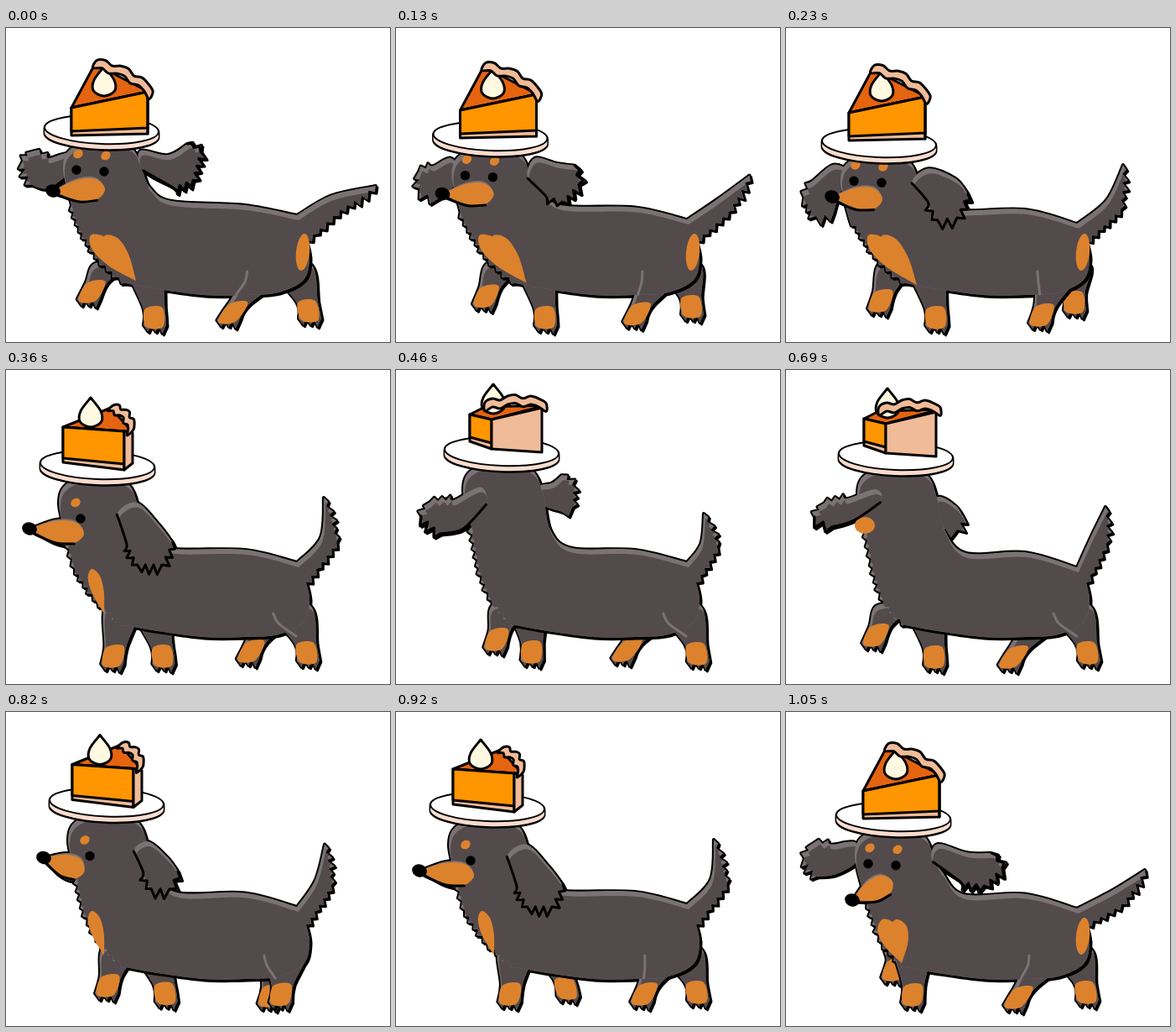
An HTML page with a canvas that plays this animation: 458 px wide and 374 px high, repeating every 1.15 s.

```html
<!DOCTYPE html>
<html lang="en">
<head>
<meta charset="utf-8">
<title>Dachshund with pie</title>
<style>
html, body { margin: 0; width: 100%; height: 100%; overflow: hidden; background: #fff; }
canvas { display: block; }
</style>
</head>
<body>
<canvas id="stage" width="458" height="374"></canvas>
<script>
const ctx = document.getElementById('stage').getContext('2d');
const INK = '#000', COAT = '#534a4b', SHEEN = '#7b7274', TAN = '#dc822d';
const ORANGE = '#ff9500', FILLING = '#e4640f', CRUST = '#f0bb98', CREAM = '#fff9e2';

// Ears: root x, y, end x, y, bow, half width. Tail: tip x, y, bow.
// Paws: near front, far front, near rear, far rear.
const poses = [
  { view: 'front', plate: [114, 121], lift: 5, bob: -6, tail: [441, 188, -7],
    nose: [56, 194], cheek: [118, 192], bib: [155, 301],
    earL: [76, 160, 20, 158, -14, 20], earR: [162, 158, 232, 147, 18, 22],
    paws: [[177, 346], [102, 315], [270, 340], [361, 338]] },
  { view: 'front', plate: [111, 137], lift: -5, bob: 4, tail: [402, 163, 16],
    nose: [55, 201], cheek: [115, 204], bib: [156, 306],
    earL: [66, 168, 36, 224, 6, 20], earR: [160, 176, 204, 226, -8, 24],
    paws: [[179, 346], [113, 326], [305, 343], [344, 328]] },
  { view: 'side', plate: [109, 113], lift: 0, bob: 0, tail: [379, 152, 20],
    nose: [28, 189], cheek: [93, 195], bib: [117, 290],
    earL: null, earR: [144, 165, 186, 232, 0, 25],
    paws: [[128, 342], [187, 342], [359, 338], [292, 336]] },
  { view: 'back', plate: [126, 97], lift: 0, bob: 0, tail: [367, 171, 14],
    nose: [62, 157], cheek: [80, 172], bib: null,
    earL: [104, 150, 30, 174, -12, 20], earR: [172, 150, 210, 137, 8, 20],
    paws: [[120, 322], [162, 337], [359, 339], [275, 335]] },
  { view: 'back', plate: [131, 102], lift: 0, bob: 6, tail: [381, 163, 6],
    nose: [62, 158], cheek: [94, 185], bib: null,
    earL: [110, 150, 34, 175, -5, 15], earR: [178, 155, 204, 190, -4, 13],
    paws: [[107, 317], [177, 343], [360, 338], [271, 343]] },
  { view: 'side', plate: [109, 113], lift: 0, bob: 0, tail: [379, 152, 20],
    nose: [28, 189], cheek: [93, 195], bib: [117, 290],
    earL: null, earR: [144, 165, 186, 232, 0, 25],
    paws: [[136, 337], [203, 330], [296, 337], [359, 335]] },
  { view: 'front', plate: [128, 125], lift: 0, bob: 5, tail: [428, 188, 8],
    nose: [79, 224], cheek: [127, 202], bib: [138, 299],
    earL: [84, 166, 22, 174, -6, 20], earR: [178, 168, 258, 186, 9, 20],
    paws: [[151, 338], [129, 308], [277, 341], [358, 335]] }
];

// Corners of the slice, from the middle of the plate: x, y, height.
const slices = {
  front: { tip: [-36, -31, 33], near: [55, -50, 50], far: [55, -50, 50], rim: [[-8, -83], [60, -48]], cream: 3 },
  side: { tip: [-41, -45, 42], near: [32, -40, 46], far: [42, -38, 36], rim: [[16, -68], [41, -40]], cream: -8 },
  back: { tip: [-38, -44, 32], near: [-12, -38, 35], far: [48, -52, 53], rim: [[-20, -53], [53, -55]], cream: -10 }
};

function mix(a, b) {
  if (typeof b === 'number') return (a + b) / 2;
  if (!a || !b || typeof b === 'string') return b;
  if (Array.isArray(b)) return b.map((v, i) => mix(a[i], v));
  return Object.fromEntries(Object.keys(b).map(k => [k, mix(a[k], b[k])]));
}

// A point part of the way from a to b, moved sideways (to the right hand of the direction).
function along([ax, ay], [bx, by], t, side = 0) {
  const dx = bx - ax, dy = by - ay, len = Math.hypot(dx, dy) || 1;
  return [ax + dx * t - dy / len * side, ay + dy * t + dx / len * side];
}

const noise = (x, y) => Math.abs(Math.sin(x * 12.9 + y * 78.2) * 43758.5) % 1;

// Smooth outline, clockwise. A third value makes a corner; above 0 it is the fur length up to the next point.
function trace(points, open) {
  const q = [];
  points.forEach((p, i) => {
    const fur = p[2], next = points[(i + 1) % points.length];
    q.push(p);
    if (fur === undefined) return;
    q.push(p);
    if (!fur || open && i === points.length - 1) return;
    const n = Math.max(1, Math.round(Math.hypot(next[0] - p[0], next[1] - p[1]) / 10));
    for (let j = 0; j < n; j++) {
      const r = noise(i, j);
      const tip = along(p, next, (j + .35 + .3 * r) / n, -fur * (.6 + .7 * r));
      tip[1] += fur * .3;
      q.push(tip, tip);
      if (j < n - 1) {
        const dip = along(p, next, (j + 1) / n);
        q.push(dip, dip);
      }
    }
  });
  const n = q.length, path = new Path2D();
  const at = i => open ? q[Math.max(0, Math.min(n - 1, i))] : q[(i + n) % n];
  path.moveTo(q[0][0], q[0][1]);
  for (let i = 0; i < n - (open ? 1 : 0); i++) {
    const [a, b, c, d] = [at(i - 1), at(i), at(i + 1), at(i + 2)];
    if (b === c) continue;
    path.bezierCurveTo(b[0] + (c[0] - a[0]) / 6, b[1] + (c[1] - a[1]) / 6,
      c[0] - (d[0] - b[0]) / 6, c[1] - (d[1] - b[1]) / 6, c[0], c[1]);
  }
  if (!open) path.closePath();
  return path;
}

function polygon(points) {
  return trace(points.map(([x, y]) => [x, y, 0]));
}

function oval(x, y, rx, ry = rx, turn = 0) {
  const path = new Path2D();
  path.ellipse(x, y, rx, ry, turn, 0, 7);
  return path;
}

function teardrop(a, b, w) {
  return trace([[...a, 0], along(a, b, .45, -w * .85), along(a, b, .82, -w * .9), b,
    along(a, b, .82, w * .9), along(a, b, .45, w * .85)]);
}

function fill(path, color) {
  ctx.fillStyle = color;
  ctx.fill(path);
}

function line(path, color = INK, width = 3) {
  ctx.strokeStyle = color;
  ctx.lineWidth = width;
  ctx.stroke(path);
}

function inked(path, color) {
  fill(path, color);
  line(path);
}

function shifted(x, y, act) {
  ctx.save();
  ctx.translate(x, y);
  act();
  ctx.restore();
}

function edge(path) {
  line(path, INK, 4);
  shifted(2, 2, () => inked(path, INK));
}

function coat(path) {
  fill(path, SHEEN);
  ctx.save();
  ctx.clip(path);
  shifted(2, 6, () => fill(path, COAT));
  ctx.restore();
}

function leg([x, y], rear) {
  const hip = rear ? 334 + (x - 334) * .1 : 150 + (x - 150) * .5, half = rear ? 26 : 20;
  const lean = (hip - x) / (y - 280) * .6;
  const at = (dx, dy) => [x + dx - dy * lean, y + dy];
  return {
    shape: trace([[hip - half, 280], [hip + half, 280], at(14, -12), [...at(13, 8), 8], [...at(-14, 8), 0], at(-12, -12)]),
    foot: trace([at(-10, -11), at(11, -13), at(9, 10), at(-11, 10)])
  };
}

function ear([rx, ry, ex, ey, bow, w]) {
  const root = [rx, ry], end = [ex, ey];
  const at = (t, side) => along(root, end, t, side * w + bow * Math.sin(Math.PI * t));
  return [at(0, -.55), at(.45, -.9), [...at(.8, -1), 8], [...at(1, 0), 8], [...at(.8, 1), 6], at(.45, .9), at(0, .55)];
}

function trunk({ plate: [x, y], bob, tail: [tx, ty, bow] }) {
  const base = [352, 240], tip = [tx, ty];
  return trace([
    [x - 46, y + 46], [x - 36, y + 22], [x, y + 12], [x + 36, y + 22], [x + 49, y + 50],
    [x + 58, 190], [x + 84, 212 + bob], [285, 214 + bob / 2], [347, 229 + bob, 0],
    along(base, tip, .5, bow - 10), [tx, ty, 6], [...along(base, tip, .5, bow + 10), 5],
    [358, 253, 0], [362, 275], [355, 300], [325, 315], [285, 318], [235, 318], [175, 310],
    [143, 304, 4], [74 + x * .32, 275, 4], [x - 27, 236, 4], [x - 36, y + 90, 0]
  ]);
}

function face({ view, plate: [x, y], nose, cheek }) {
  const side = view === 'side', nod = (nose[1] - y - 73) * .3;
  const eyes = side ? [[-20, 64]] : [[-30, 48 + nod], [3, 50 + nod]];
  fill(teardrop(nose, cheek, 14), TAN);
  line(trace([along(nose, cheek, .1, 6), along(nose, cheek, .5, 14), along(nose, cheek, .84, 13)], true));
  for (const [dx, dy] of eyes) {
    fill(oval(x + dx, y + dy, 5.7), INK);
    fill(oval(x + dx + (side ? -6 : 2), y + dy - 19, 6, 5, -.6), TAN);
  }
  fill(oval(...nose, 9, 7.5, .3), INK);
}

function bib({ view, plate: [x], bib: tip }) {
  if (view === 'side') return fill(teardrop(tip, [102, 237], 8), TAN);
  for (const dx of [-13, 4]) fill(teardrop(tip, [x + dx, 247], 12), TAN);
}

function crustWave(a, b) {
  const outer = [], inner = [];
  for (let i = 0; i <= 8; i++) {
    const t = i / 8, swell = 7 * Math.sin(Math.PI * t) + 2.5 * Math.sin(i * 2.2);
    outer.push(along(a, b, t, -swell - 5));
    inner.unshift(along(a, b, t, 5 - swell));
  }
  return trace([...outer, ...inner]);
}

function slice({ tip, near, far, rim, cream }) {
  const down = ([x, y, h], up = 0) => [x, y + h - up];
  inked(polygon([tip, rim[0], rim[1], near]), FILLING);
  inked(teardrop([cream, -80], [cream, -45], 14), CREAM);
  inked(polygon([tip, near, down(near), down(tip)]), CRUST);
  inked(polygon([tip, near, down(near, 7), down(tip, 5)]), ORANGE);
  inked(polygon([near, far, down(far), down(near)]), CRUST);
  inked(crustWave(...rim), CRUST);
}

function dish() {
  const rim = new Path2D();
  rim.ellipse(0, 6, 68, 17, .04, 0, Math.PI);
  rim.ellipse(0, 0, 68, 17, .04, Math.PI, 2 * Math.PI);
  rim.closePath();
  shifted(0, 1, () => line(rim, INK, 3));
  fill(rim, '#f8dccd');
  const top = oval(0, 0, 68, 17, .04);
  fill(top, '#fff');
  line(top, INK, 2);
}

function draw(pose) {
  const { view, plate, lift, nose, cheek, earL, earR, paws } = pose;
  const back = view === 'back';
  const [nearFront, farFront, nearRear, farRear] = paws.map((p, i) => leg(p, i > 1));
  const left = earL && ear(earL), right = ear(earR);
  ctx.fillStyle = '#fff';
  ctx.fillRect(0, 0, 458, 374);
  ctx.lineJoin = ctx.lineCap = 'round';

  for (const { shape, foot } of [farFront, farRear]) {
    edge(shape);
    coat(shape);
    fill(foot, TAN);
  }
  if (back) fill(oval(...nose, 8, 6), INK);

  const ears = [left && trace(left), trace(right)];
  if (back) ears.reverse();
  const [under, over] = ears;
  const solid = [under, nearFront.shape, nearRear.shape, trunk(pose),
    !back && teardrop(nose, cheek, 16)].filter(Boolean);
  [...solid, over].forEach(edge);
  solid.forEach(coat);
  if (back) fill(oval(...cheek, 12, 10), TAN);
  coat(over);
  line(trace(back ? left.slice(0, 4) : right.slice(2), true));

  fill(nearFront.foot, TAN);
  fill(nearRear.foot, TAN);
  const reach = paws[2][0] - 334;
  line(trace([[310 + reach * .35, 290], [314 + reach * .45, 302], [326 + reach * .8, 317]], true), SHEEN);
  if (view === 'front') fill(oval(354, 267, 8, 22, .1), TAN);
  if (!back) {
    bib(pose);
    face(pose);
  }
  shifted(...plate, dish);
  shifted(plate[0], plate[1] + lift, () => slice(slices[view]));
}

const [a, b, c, d, e, f, g] = poses;
const steps = [a, mix(a, b), b, c, d, mix(d, e), e, mix(e, f), f, g];
const ends = [130, 230, 360, 460, 590, 690, 820, 920, 1050, 1150];
let shown = -1;

function tick() {
  const t = performance.now() % 1150, i = ends.findIndex(end => t < end);
  if (i !== shown) draw(steps[shown = i]);
  requestAnimationFrame(tick);
}
tick();
</script>
</body>
</html>
```
